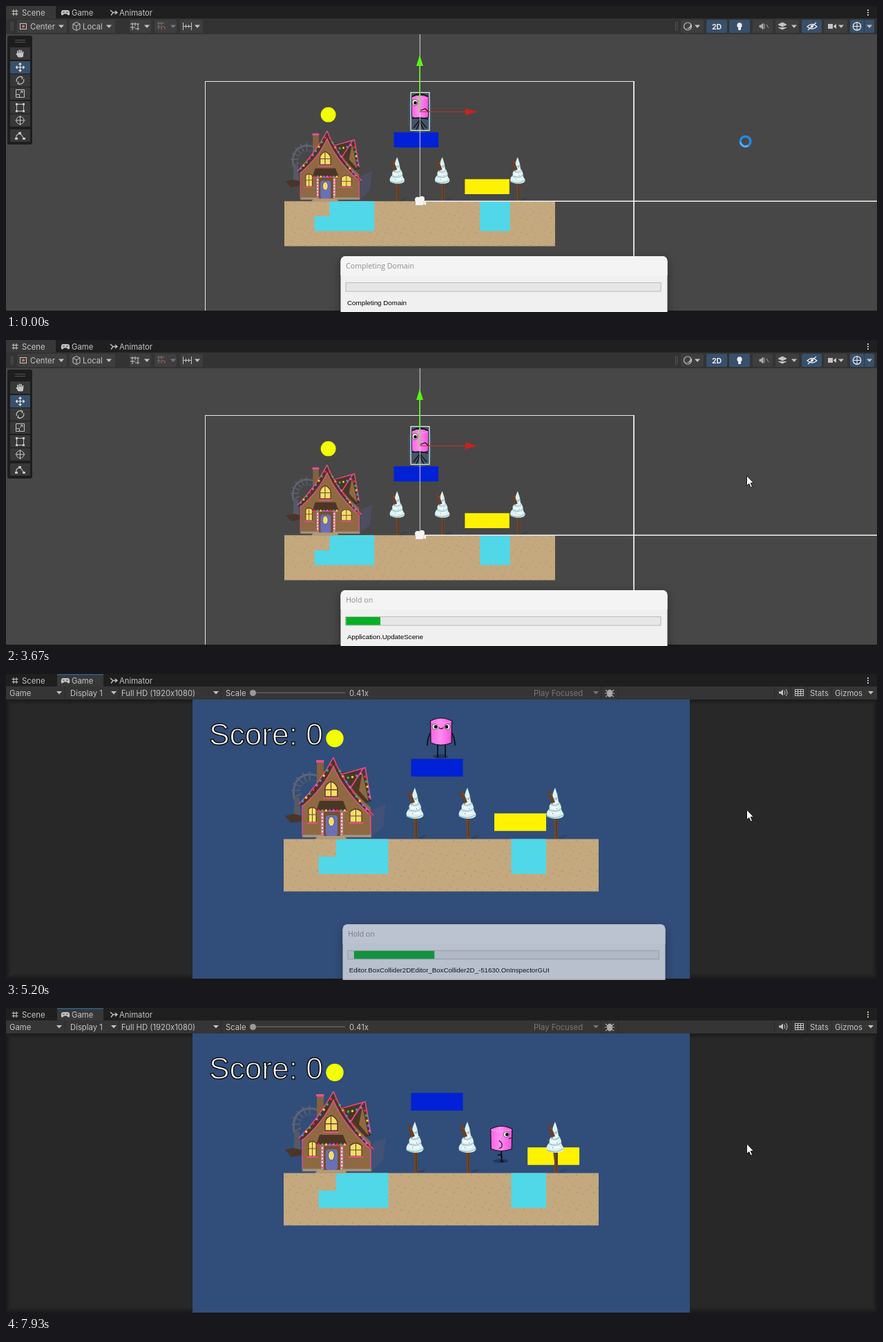
These frames come from a looping animation (1261x444 px, 8 s). An HTML page with a canvas:

```html
<!DOCTYPE html>
<html lang="en">
<head>
<meta charset="utf-8">
<title>Game editor</title>
<style>
html, body { margin: 0; width: 100%; height: 100%; overflow: hidden; background: #282828; }
canvas { display: block; }
</style>
</head>
<body>
<canvas id="stage" width="1261" height="444"></canvas>
<script>
const stage = document.getElementById('stage').getContext('2d');
const sheet = Object.assign(document.createElement('canvas'), { width: 1261, height: 444 });
let c = stage;
const LOOP = 8000, TILE = 76 / 3;
const UI = '11.3px Inter, sans-serif', LIGHT = '#c4c4c4', ON = '#38506b';
const clamp = (v, lo, hi) => Math.min(hi, Math.max(lo, v));

function box(x, y, w, h, fill, r = 0) {
  c.fillStyle = fill;
  c.beginPath();
  c.roundRect(x, y, w, h, r);
  c.fill();
}
function frame(x, y, w, h, color, lw = 1) {
  c.strokeStyle = color;
  c.lineWidth = lw;
  c.strokeRect(x, y, w, h);
}
function path(d, fill, stroke, lw = 1) {
  const p = new Path2D(d);
  if (fill) { c.fillStyle = fill; c.fill(p); }
  if (stroke) { c.strokeStyle = stroke; c.lineWidth = lw; c.stroke(p); }
}
function oval(x, y, rx, ry, fill, stroke, lw = 1) {
  c.beginPath();
  c.ellipse(x, y, rx, ry, 0, 0, 7);
  if (fill) { c.fillStyle = fill; c.fill(); }
  if (stroke) { c.strokeStyle = stroke; c.lineWidth = lw; c.stroke(); }
}
function text(s, x, y, color = LIGHT, font = UI) {
  c.font = font;
  c.fillStyle = color;
  c.fillText(s, x, y);
}
function at(x, y, draw, scale = 1) {
  c.save();
  c.translate(x, y);
  c.scale(scale, scale);
  draw();
  c.restore();
}
const arrow = (x, y, color = LIGHT) => path(`M${x - 4} ${y - 2}h8l-4 4.5z`, color);

// ---- World, in game view pixels ----
function ground() {
  box(402, 239.5, 456, 76, '#c4a97f');
  const tints = ['#c08a70', '#a3a677', '#ab8d66', '#cd9a84'];
  for (let i = 0; i < 18; i++) for (let j = 0; j < 3; j++) for (let k = 0; k < 9; k++) {
    box(402 + i * TILE + (k * 7.3 + 3) % 24, 240 + j * TILE + (k * 10.7 + 4) % 24, 1.5, 1.5, tints[k % 4]);
  }
  const water = '#50d8e8';
  box(452.7, 265, 26, 25, water);
  box(478, 239.5, 75.5, 50.5, water);
  box(731.5, 239.5, 50.5, 50.5, water);
}

function lights(x0, y0, x1, y1, n, sag = 0) {
  const tints = ['#f02c5e', '#36b65a', '#f0d040', '#4a8ce8', '#e05ad8'];
  for (let i = 0; i < n; i++) {
    const p = (i + .5) / n;
    oval(x0 + (x1 - x0) * p, y0 + (y1 - y0) * p + sag * 4 * p * (1 - p), 1.7, 1.8, tints[i % 5]);
  }
}

function house() {
  const pink = '#e8508f', dark = '#4b3626', wood = '#8f6942', glow = '#f2de68';
  path('M530 197l20-9-4 34-17 14z', '#50557788');
  // wheel
  path('M452 148Q432 141 421 155Q413 168 418 182', null, '#5d6571', 3);
  path('M452 156Q435 151 427 163Q422 172 424 184', null, '#4d5461', 1.5);
  for (let a = 2.7; a < 4.9; a += .4) {
    const u = Math.cos(a), v = Math.sin(a);
    path(`M${440 + 14 * u} ${168 + 14 * v}L${440 + 27 * u} ${168 + 27 * v}`, null, '#5d6571', 1.5);
  }
  path('M418 178l7 2 2 30-11-1z', '#535a66');
  path('M404 206l12-3 14 3-3 8-14 2z', '#4a3529');
  // back gable and chimney
  path('M478 146l42-10 8 48-20 6z', dark, '#2f2118');
  path('M516 143l9 42-14-16z', wood);
  path('M480 147l40-11 8 46M517 137l-18 28 11 14', null, pink, 1.6);
  box(450, 126, 10, 32, '#85603f');
  box(449, 125, 11.5, 3.5, pink, 1);
  // front wall and roof
  path('M474 124Q460 152 430 187V235H528V194Q490 160 474 124z', wood);
  path('M474 121Q456 156 424 190l5 2Q462 162 474 133Q488 170 527 203l5 2Q490 160 474 121z', dark);
  path('M474 121Q456 156 424 189M474 121Q488 160 532 205M429 192Q460 165 474 134Q488 168 525 203', null, pink, 1.5);
  lights(473, 128, 427, 187, 9, 4);
  lights(476, 128, 529, 204, 11, 5);
  lights(486, 150, 517, 143, 5, 3);
  lights(519, 145, 527, 182, 5);
  // windows
  path('M462 178V165Q464 158 471 156Q477 158 480 165V178z', glow, '#5b3a20', 1.5);
  path('M470.500 157v21M462 168h18', null, '#6a4526', 1.3);
  path('M438 215V196q5-5 11 0v19z', glow, '#5b3a20', 1.2);
  path('M498 215v-15q8-8 17 0v15z', glow, '#5b3a20', 1.2);
  path('M443.500 194v21M438 204h11M506.500 196v19M498 206h17', null, '#6a4526');
  path('M460 180h22M436 216h15M496 216h21', null, pink, 2);
  // porch
  box(456, 197, 31, 38, '#74502f');
  box(463, 205, 17, 30, '#6a70b8', 4);
  oval(471, 214, 4.5, 7, glow, '#4a4a86');
  path('M454 184h34l6 15h-45z', dark);
  path('M449 199h45', null, pink, 1.3);
  lights(450, 198, 493, 198, 8);
  for (const x of [458, 486]) {
    path(`M${x} 200V235`, null, '#f0d5de', 3);
    c.setLineDash([2, 3]);
    path(`M${x} 200V235`, null, pink, 3);
    c.setLineDash([]);
  }
  path('M429 190V234M528 204V234', null, pink, 1.4);
  path('M429 233h30v4h-30zM486 233h43v4h-43z', '#a79683', '#786752', .7);
  path('M452 235h38l4 5H447z', '#b59878');
}

function tree(x) {
  at(x, 165, () => {
    path('M2 74l12-6 3 1-6 5z', '#283c5c80');
    path('M-3 43h7l0 30q-3 2-6 0l1-14z', '#6b482f');
    path('M2 45v27', null, '#53351f', 1.4);
    path('M0 0Q-4 8-4 14Q-6 18-5 22Q-10 26-8 30Q-14 36-12 41Q-4 47 8 44Q14 42 12 37Q8 32 9 28Q8 24 5 20Q4 10 0 0z', '#dcf0f1');
    path('M-4 15Q1 18 4 13M-6 24Q1 28 7 22M-9 32Q2 37 9 30M-12 41Q0 47 12 39', null, '#93c4cb', 1.4);
    path('M-3 20l6 1M-6 29l11 1M-7 38l14-1', null, '#f8ffff', 1.8);
    path('M-11 7l4-3 7 17-5 2z', '#65402b');
    for (let i = 0; i < 5; i++) box((i * 7) % 13 - 6, 9 + i * 7, 1.2, 1.2, '#c75862');
  });
}

function world(yellowX, blueOn) {
  ground();
  house();
  if (blueOn) box(586.5, 123.2, 75, 25.5, '#0021d6');
  box(yellowX, 202.2, 75, 25.5, '#fff200');
  [592, 668, 795].forEach(tree);
  oval(476, 93.5, 12.7, 12.7, '#f2ff00');
}

// ---- Marshmallow; origin is centred between the feet ----
function body(top, bottom) {
  const g = c.createLinearGradient(-16, 0, 16, 0);
  g.addColorStop(0, '#fb62e4');
  g.addColorStop(.45, '#ff8df0');
  g.addColorStop(.75, '#fb6ae8');
  g.addColorStop(1, '#ea55d8');
  path(`M-15.500 ${top + 4}Q0 ${top - 4} 15.500 ${top + 4}L15 ${bottom - 3}Q0 ${bottom + 3}-15 ${bottom - 3}z`, g, '#151018', 1.2);
  path(`M-14.500 ${top + 5}Q0 ${top + 10} 14.500 ${top + 5}`, null, '#ff9df4', 1);
}
function eye(x, y, dx = 0) {
  oval(x, y, 4, 4, '#fff', '#111', .6);
  oval(x + dx, y, 2.3, 2.5, '#000');
}
function marshmallow(x, feet, pose, t) {
  at(x, feet, () => {
    const ink = '#0d0b12', swing = Math.sin(t / 70);
    c.lineCap = 'round';
    oval(-1, -2.5, 11, 3, '#22375c');
    if (pose === 'idle') {
      path('M-5-20V-1M6-20V-1M-16-36Q-20-27-20-19M16-36Q20-27 20-19', null, ink, 1.7);
      body(-58, -19);
      eye(-9, -45.5, 1);
      eye(9, -45.5, -1);
      path('M-3-44Q0-41 3-44', null, ink, 1.1);
    } else if (pose === 'back') {
      const lift = swing * 5;
      path(`M-6-22l1 5-4 4 1 ${7 - lift}M5-22V${Math.min(0, lift) - 1}M-16-36Q-20-29-20-21M16-36Q20-29 20-21`, null, ink, 1.7);
      body(-58, -21);
    } else {
      path(`M0-18V-9L${4 * swing}-9l-1 7M0-9L${-4 * swing}-12l-4 1M-1-2h4`, null, ink, 1.7);
      body(-53, -17);
      eye(7, -41, 1);
      path('M11-35l3-1M-3-32Q3-28 0-22l-3 1', null, ink, 1.1);
    }
    c.lineCap = 'butt';
  });
}

// ---- Editor chrome ----
function tabs(game) {
  box(0, 0, 1261, 18, '#1f1f1f');
  box(game ? 74 : 0, 0, game ? 67 : 72, 18, '#383838');
  if (game) box(74, 0, 67, 1.5, '#2b5c8c');
  path('M11 5v9M15 5v9M8.500 7.500h9M8.500 11.500h9', null, LIGHT, 1.1);
  text('Scene', 23, 14);
  path('M82 6h8q3 1 2 7l-2 .500-2-2h-4l-2 2-2-.500q-1-6 2-7z', LIGHT);
  box(82, 8.5, 3, 1, '#333');
  box(87, 8.5, 3, 1, '#333');
  text('Game', 95, 14);
  path('M151 6l4 3.500h5M155 9.500l-3 4M158 7l3 2.500-3 2.500', null, LIGHT, 1.3);
  text('Animator', 164, 14);
  for (const y of [5, 8.5, 12]) box(1247, y, 2, 2, LIGHT);
}

function sceneToolbar() {
  box(0, 18, 1261, 23, '#333');
  const buttons = [[16, 72], [92, 66], [179, 31], [215, 32], [252, 33], [977, 33], [1014, 30, 1], [1047, 30, 1],
    [1081, 29], [1114, 34], [1152, 29, 1], [1184, 34], [1222, 35, 1]];
  for (const [x, w, on] of buttons) box(x, 20, w, 19, on ? ON : '#3e3e3e', 2);
  path('M7.500 23v13M10 23v13M969.500 23v13M972 23v13', null, '#555');
  text('Center', 35, 33.5);
  text('Local', 111, 33.5);
  text('2D', 1022, 33.5, '#eee', 'bold 10.5px Inter, sans-serif');
  [80, 149, 204, 277, 1001, 1141, 1209, 1250].forEach(x => arrow(x, 29.5));
  arrow(242, 29.5, '#777');
  frame(20.5, 25.5, 9, 8, LIGHT);
  oval(25, 29.5, 2, 2, '#e07050');
  path('M97 26l5-2.500 5 2.500v7l-5 2.500-5-2.500zM97 26l5 3 5-3M102 29v6', null, LIGHT);
  path('M183 24v11M187 24v5M180 26h13M180 31h7M191 26v9M187 33h6', null, LIGHT);
  path('M219 25h10M221 23v11M225 23v5M219 30h5', null, '#777');
  path('M225 34v-3q2-3 5 0v3', null, '#a05050', 1.5);
  path('M256.500 24v11M268.500 24v11M260.500 27v5M264.500 27v5M256 29.500h13', null, LIGHT);
  oval(987, 29.5, 5.5, 5.5, null, LIGHT, 1.2);
  path('M983 33Q991 33 991 25Q995 34 983 33z', LIGHT);
  oval(1062, 28, 3.6, 3.8, '#eee');
  box(1060, 31, 4, 4, '#eee', 1);
  path('M1091 28h2l3-3v9l-3-3h-2zM1098 26v7M1101 27l3 5', '#aaa', '#aaa');
  path('M1118 27l6-3 6 3-6 3zM1118 31l6 3 6-3', LIGHT, LIGHT);
  path('M1160 30Q1167 23 1174 30Q1167 36 1160 30zM1161 35l12-11', null, '#eee', 1.3);
  oval(1167, 29.5, 2, 2, '#eee');
  path('M1190 26h7v7h-7zM1198 29l4-3v7l-4-3z', LIGHT);
  oval(1232, 29.5, 5.7, 5.7, null, '#eee', 1.2);
  path('M1226 29.500h12M1232 23v13', null, '#eee');
  path('M1242.500 20v19', null, '#29394b');
}

function toolPalette() {
  box(2, 43, 36, 158, '#1d1d1d', 3);
  path('M13 49.500h15M13 52.500h15', null, '#555');
  [60, 80, 99, 118, 138, 157, 179].forEach((y, i) => box(6, y, 29, 18, i === 1 ? ON : '#383838', 1));
  path('M17 70V65M19.500 69V63.500M22 69V64M24.500 70V66M15 69l3 4', null, LIGHT, 1.7);
  box(16.5, 68, 8.5, 6.5, LIGHT, 2.5);
  path('M20.500 83v12M14.500 89h12M18.500 85l2-2 2 2M18.500 93l2 2 2-2M16.500 87l-2 2 2 2M24.500 87l2 2-2 2', null, '#eee', 1.1);
  path('M15.500 110a5.500 5.500 0 0 1 8-6.500M25.500 106a5.500 5.500 0 0 1-8 6.500M21 102l3 1.500-1 3M20 114l-3-1.500 1-3', null, LIGHT, 1.2);
  path('M14.500 121.500h12v11h-12zM14.500 128.500h5v4M20 127l4-3.500M21 123.500h3v3', null, LIGHT);
  path('M15.500 143v9M25.500 143v9M16 142.500h9M16 152.500h9', null, LIGHT);
  for (const x of [14, 24]) for (const y of [141, 151]) box(x, y, 3, 3, LIGHT);
  oval(20.5, 166, 5.5, 5.5, null, LIGHT);
  path('M20.500 159v14M13.500 166h14', null, LIGHT);
  path('M15 193v-5l5-4 5 7M20 184v3', null, LIGHT, 1.1);
  box(13, 191, 4, 3, LIGHT);
  box(24, 191, 4, 3, LIGHT);
  box(18, 183, 4, 3, LIGHT);
}

function sceneView() {
  box(0, 0, 1261, 444, '#474747');
  c.save();
  c.translate(403, 283.2);
  c.scale(.8596, .8596);
  c.translate(-402, -239.5);
  world(706, true);
  c.restore();
  frame(288.5, 109.5, 620.5, 400, '#e8e8e8');
  path('M909 109V444', null, '#f0f0f0', 1.6);
  // selected character with collider
  box(582.5, 128, 33.5, 56, '#3e5f9070', 14);
  box(586, 125, 27, 56, '#465467');
  at(599.5, 189, () => body(-75, -32), .8);
  path('M588 131Q599 124 611 131M588 163l11-1 12 2M590 177l9-12 10 12M594 180l5-12 6 12M599 152l8 -3 5 5', null, '#101018', 1.3);
  oval(592, 140, 4, 4.5, '#fff', '#111', .7);
  oval(592.5, 140.5, 2.3, 2.5, '#000');
  frame(586, 125.5, 27, 55, '#d5f0d8', 1.3);
  path('M599.300 41V284', null, '#d8d8d8');
  path('M599 283.200H1261', null, '#f4f4f4', 1.6);
  path('M599 153V84', null, '#62f01c', 1.5);
  path('M599 71l5 16h-10z', '#58f414');
  path('M599 153.500H668', null, '#d22a1c', 1.2);
  path('M682 153.500l-17-5v10z', '#cc2318');
  oval(596, 281, 4, 4, '#f4f4f4');
  oval(602, 280, 4, 4, '#f4f4f4');
  path('M593 282h11v7h-11zM604 285l4-2v6l-4-2z', '#f4f4f4');
  tabs(false);
  sceneToolbar();
  toolPalette();
}

function gameView(t) {
  box(0, 0, 1261, 444, '#282828');
  for (let i = 0; i < 7; i++) frame(i + .5, 37.5 + i, 1260 - 2 * i, 404 - 2 * i, `rgba(0,0,0,${.32 - i * .045})`);
  box(270, 37, 720, 405, '#314d79');
  const moving = t >= 6130;
  world(moving ? 709 + (t - 6130) * .0256 : 707, !(moving && t < 7130));

  const x = 630 + clamp((t - 6575) * .146, 0, 71) + clamp((t - 7820) * .146, 0, 40);
  const fall = Math.max(0, t - 6890);
  const drop = Math.min(101, fall * fall * 25e-5);
  const pose = t >= 7800 || (t > 6575 && t < 7061) ? 'side' : t >= 7061 ? 'back' : 'idle';
  marshmallow(x, (moving ? 123.5 : 122) + drop, pose, t);

  if (t >= 5070) {
    text('Score: 0', 294, 102.5, '#fff', '44.3px "Liberation Sans", Arial, sans-serif');
    c.strokeStyle = '#101010';
    c.lineWidth = 1.5;
    c.lineJoin = 'round';
    c.strokeText('Score: 0', 294, 102.5);
    c.lineJoin = 'miter';
  }

  tabs(true);
  box(0, 18, 1261, 19, '#353535');
  path('M85.500 18v19M163.500 18v19M311.500 18v19M861.500 18v19M886.500 18v19M1112.500 18v19M1136.500 18v19M1160.500 18v19M1195.500 18v19', null, '#2a2a2a');
  const labels = [['Game', 5], ['Display 1', 93], ['Full HD (1920x1080)', 167], ['Scale', 318], ['0.41x', 497], ['Stats', 1164], ['Gizmos', 1200]];
  for (const [s, lx] of labels) text(s, lx, 31.5);
  text('Play Focused', 764, 31.5, '#777');
  [77, 156, 304, 1252].forEach(ax => arrow(ax, 27));
  arrow(854, 27, '#777');
  box(357, 26.5, 134, 1.5, '#606060');
  oval(357.5, 27.5, 4.5, 4.5, '#999');
  path('M868 23l3 3M880 23l-3 3M867 28h14M868 33l3-2M880 33l-3-2', null, '#aaa', 1.2);
  oval(874, 28, 4, 5.5, '#aaa');
  path('M1119 25.500h2.500l3.500-3v9l-3.500-3h-2.500z', LIGHT);
  path('M1127 24q2 3 0 6M1129 22q4 5 0 10', null, LIGHT);
  frame(1142.5, 22.5, 12, 9, LIGHT);
  path('M1143 25.500h11M1143 28.500h11M1146.500 23v8M1150.500 23v8', null, LIGHT);
}

// ---- Progress dialog, drawn on its own sheet so that it fades as a whole ----
function dialog(title, message, barEnd, alpha = 1, scale = 1) {
  c = sheet.getContext('2d');
  c.clearRect(0, 0, 1261, 444);
  c.save();
  c.translate(720.5, 390);
  c.scale(scale, scale);
  c.translate(-721, -390);
  c.shadowColor = 'rgba(0,0,0,.4)';
  c.shadowBlur = 14;
  c.shadowOffsetY = 4;
  box(485, 363, 473, 100, '#f0f0f0', 7);
  c.shadowColor = 'transparent';
  box(485, 363, 473, 28, '#f4f4f4', [7, 7, 0, 0]);
  text(title, 492.5, 380.5, '#8c8c8c', '10.65px "Open Sans", sans-serif');
  box(492, 401, 457, 13.5, '#e6e6e6');
  const start = Math.max(492, barEnd - 118);
  if (barEnd > start) box(start, 401.5, barEnd - start, 12.5, '#06b025');
  frame(492.5, 401.5, 456, 12.5, '#bcbcbc');
  text(message, 494.5, 434, '#000', '9.8px "Liberation Sans", Arial, sans-serif');
  c.restore();
  c = stage;
  c.globalAlpha = alpha;
  c.drawImage(sheet, 0, 0);
  c.globalAlpha = 1;
}

function progress(t) {
  if (t >= 5330) return;
  if (t < 2600) return dialog('Completing Domain', 'Completing Domain', 0);
  if (t < 2730) return dialog('Hold on...', 'Importing assets', 0);
  const scene = 'Application.UpdateScene';
  const inspector = 'Editor.BoxCollider2DEditor_BoxCollider2D_-51630.OnInspectorGUI';
  const message = t < 3670 ? 'Application.Message' : t < 4270 ? scene : t < 4330 ? inspector
    : t < 4470 ? scene : t < 4670 ? 'Toolbar.Repaint' : inspector;
  // the bar advances in two half steps every 200 ms and freezes while closing
  const e = Math.min(t, 5070) - 3530, k = Math.floor(e / 200);
  const barEnd = 537 + 11 * k + (e - k * 200 >= 140 ? 5.5 : 0);
  const open = clamp((t - 2730) / 270 + .25, 0, 1), close = clamp((t - 5070) / 260, 0, 1) ** 2;
  dialog('Hold on', message, barEnd, open * Math.max(0, 1 - 1.15 * close), 1 - .05 * close - .05 * (1 - open));
}

function pointer(t) {
  if (t < 3200) {
    const x = t < 130 ? 1070.5 : 1071.5, turn = t < 130 ? 1 : 3.5;
    oval(x, 196.5, 7.3, 7.3, null, '#2488e0', 3.6);
    c.beginPath();
    c.arc(x, 196.5, 7.3, turn, turn + 2);
    c.strokeStyle = '#58b4f4';
    c.lineWidth = 2.5;
    c.stroke();
  } else {
    at(1072.5, 197, () => path('M0 0V14.500L3.300 11.500 5.700 17 8 16 5.600 10.500H10z', '#fff', '#111', .9));
  }
}

function draw() {
  const t = performance.now() % LOOP;
  if (t < 4670) sceneView(); else gameView(t);
  box(0, 442, 1261, 2, '#191919');
  progress(t);
  pointer(t);
  requestAnimationFrame(draw);
}
draw();
</script>
</body>
</html>
```
